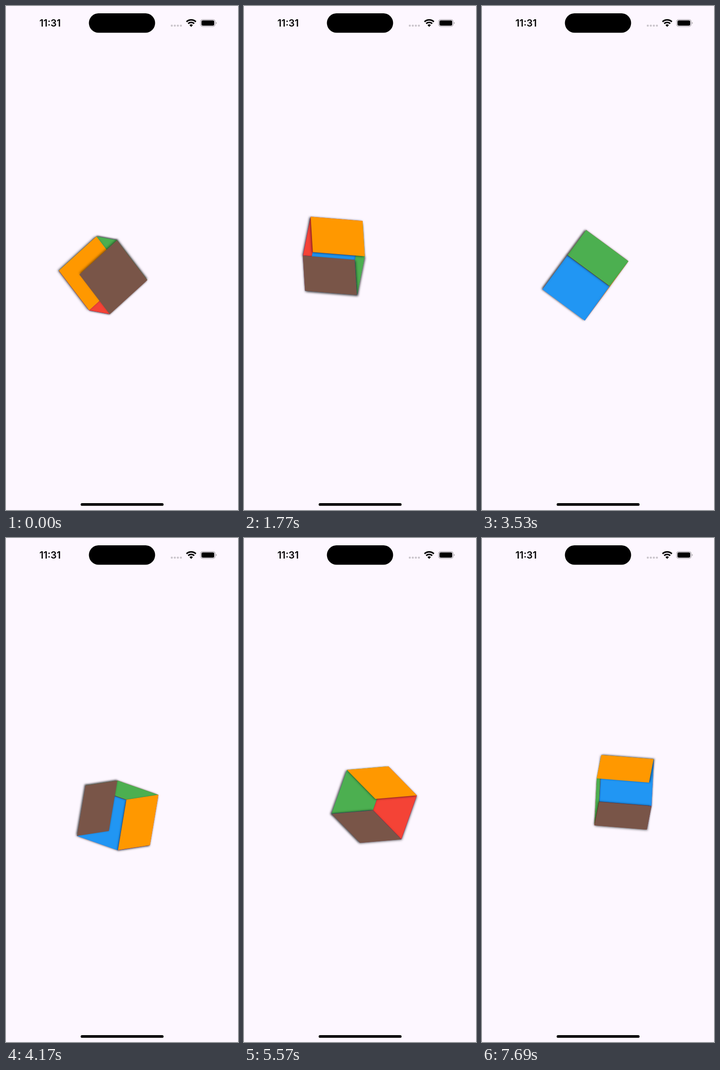
An HTML page for the animation above (7740 ms loop, 508 px wide and 1103 px high).

```html
<!DOCTYPE html>
<html lang="en">
<head>
<meta charset="utf-8">
<title>Rotating cube</title>
<style>
  html, body { margin: 0; width: 100%; height: 100%; overflow: hidden; background: #fdf7ff; }
  svg { position: absolute; left: 0; top: 0; display: block; }
  .time { font: 600 21px Inter, "Liberation Sans", sans-serif; text-anchor: middle; }
  .face {
    position: absolute;
    left: 196.28px;
    top: 493.98px;
    width: 115.45px;
    height: 115.45px;
    box-shadow: 2px 2px 6px rgba(0, 0, 0, .5);
  }
</style>
</head>
<body>
<svg width="508" height="1103" viewBox="0 0 508 1103">
  <text class="time" x="96.5" y="45.3">11:31</text>
  <rect x="181.5" y="16" width="145" height="42.5" rx="21.25"/>
  <path d="M363 43h.01M369.6 43h.01M376.3 43h.01M383 43h.01" stroke="#cac5cc" stroke-width="4.6" stroke-linecap="round"/>
  <g fill="none" stroke="#000" stroke-width="3.3">
    <path d="M395.26 34.4a15.3 15.3 0 0 1 20.48 0"/>
    <path d="M398.88 38.5a9.9 9.9 0 0 1 13.24 0"/>
  </g>
  <path d="M405.5 45.8l-3.75-4.1a5.6 5.6 0 0 1 7.5 0z"/>
  <rect x="426" y="29.6" width="32" height="15.2" rx="4.9" fill="none" stroke="#a5a1a6" stroke-width="1.2"/>
  <rect x="428" y="31.5" width="28" height="11.4" rx="3.2"/>
  <path d="M459.6 34.8q1.7 .8 1.7 2.5t-1.7 2.5z" fill="#a5a1a6"/>
  <rect x="163.5" y="1088" width="181.5" height="5.8" rx="2.9"/>
</svg>
<script>
  const SIZE = 115.45, HALF = SIZE / 2;
  const LOOP = 7740, STEP = 100 / 3, LAST_STEP = 230;
  const START = 25.523; // seconds already turned when the loop begins

  const shift = (x, y, z = 0) => `translate3d(${x}px, ${y}px, ${z}px)`;
  const hinge = (x, y, turn) => `${shift(x, y)} ${turn} ${shift(-x, -y)}`;

  // Painted in this order, without depth sorting.
  const faces = [
    ['#9c27b0', shift(0, 0, -SIZE)],
    ['#f44336', hinge(-HALF, 0, 'rotateY(90deg)')],
    ['#2196f3', hinge(HALF, 0, 'rotateY(-90deg)')],
    ['#4caf50', shift(0, 0)],
    ['#ff9800', hinge(0, -HALF, 'rotateX(-90deg)')],
    ['#795548', hinge(0, HALF, 'rotateX(90deg)')]
  ].map(([color, placement]) => {
    const element = document.createElement('div');
    element.className = 'face';
    element.style.background = color;
    document.body.append(element);
    return { element, placement: new DOMMatrix(placement) };
  });

  function draw(ms) {
    const step = Math.min(Math.floor((ms + 4) / STEP), LAST_STEP);
    const s = START + step * STEP / 1000;
    const turn = new DOMMatrix(
      `rotateX(${s * 360 / 8}deg) rotateY(${s * 360 / 12}deg) rotateZ(${s * 360 / 16}deg)`);
    for (const { element, placement } of faces) {
      const m = turn.multiply(placement);
      const flat = [m.m11, m.m12, m.m21, m.m22, m.m41, m.m42].map(n => n.toFixed(5));
      element.style.transform = `matrix(${flat})`;
    }
  }

  const begin = performance.now();
  function tick() {
    draw((performance.now() - begin) % LOOP);
    requestAnimationFrame(tick);
  }
  tick();
</script>
</body>
</html>
```
